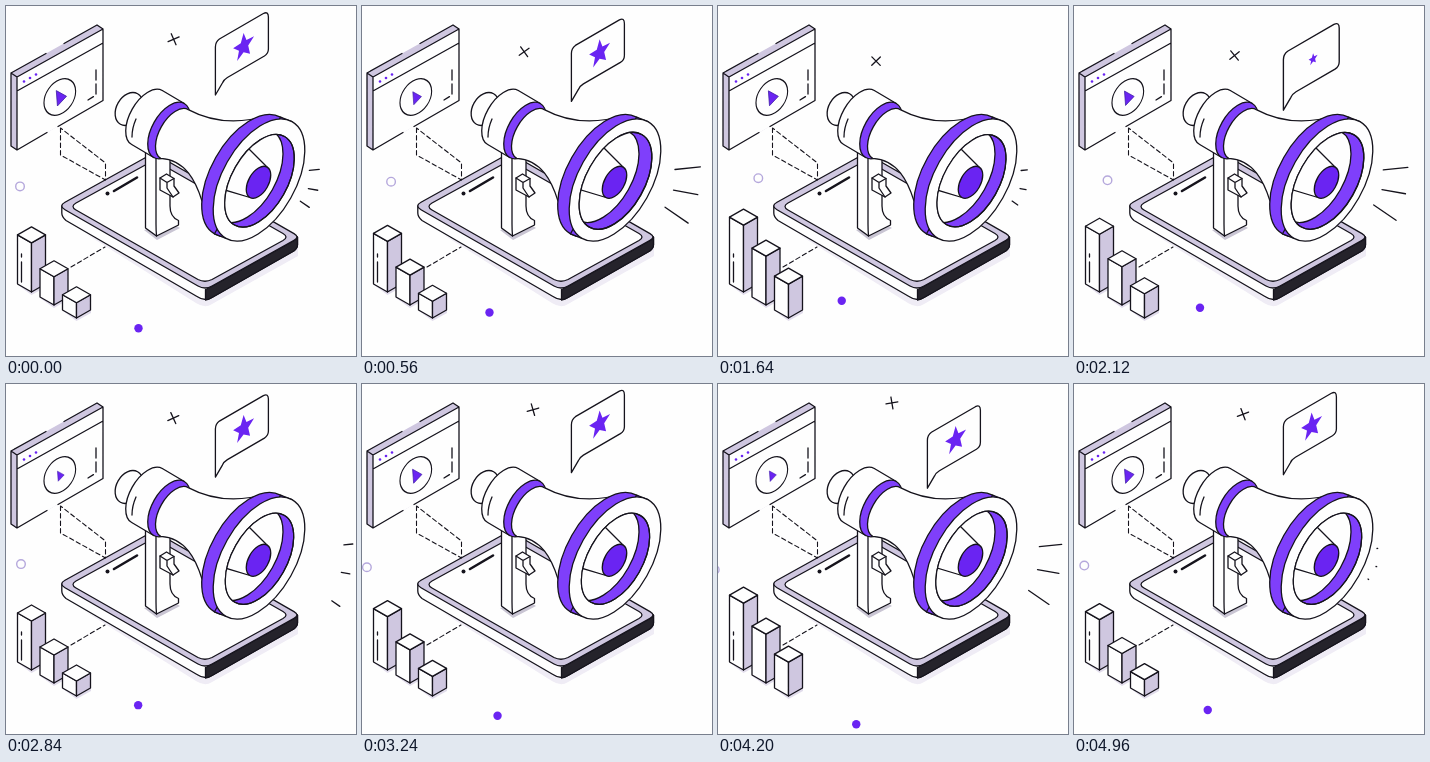
Write an HTML page that moves like this. It is 350x350 px and loops after 5 s.

```html
<!DOCTYPE html>
<html lang="en">
<head>
<meta charset="utf-8">
<title>Megaphone</title>
<style>
  html, body { margin: 0; width: 100%; height: 100%; overflow: hidden; background: #fefefe; }
  svg { display: block; width: 100vw; height: 100vh; }
  .ink { fill: none; stroke: #15131c; stroke-width: 1.3; stroke-linecap: round; stroke-linejoin: round; }
  .w { fill: #fefefe; }
  .l { fill: #cfc7e0; }
  .p { fill: #7f3ffb; }
  .s { fill: #6a24f2; }
  .shade { fill: #efecf5; }
  .dash { stroke-dasharray: 4.5 3; stroke-width: 1.1; }
</style>
</head>
<body>
<svg viewBox="0 0 350 350">
  <defs>
    <clipPath id="mouth"><ellipse class="pulse" rx="29" ry="53.200"/></clipPath>
  </defs>

  <!-- phone -->
  <path class="shade" d="M80 228L190 297Q199 303 206 298L292 250V238L198 285Z"/>
  <g class="ink">
    <path class="w" d="M55.800 200V207Q55.800 211 60 214.500L191 290.500Q199 296 206 291.500L286 246Q291.500 243 291.500 239V231L199 270Z"/>
    <path d="M199.500 283.500Q203 282 206 280.200L288 234.400Q291.500 232.500 291.500 231V239Q291.500 243 286 246L206 291.500Q203 293.500 199.500 294Z" fill="#25232b"/>
    <path class="l" d="M59 196.300L141 150.700Q147.500 147 154 150.700L288 227.600Q294 231 288 234.400L206 280Q199 284 192 280L59 203.800Q52.500 200 59 196.300Z"/>
    <path class="w" d="M70 197L142 157.500Q148 154 154 157.500L277 227.500Q283 231 277 234.500L206 273.500Q199 277 192 273.500L70 204Q64 200.500 70 197Z"/>
    <path d="M108 185L131 171.500" stroke-width="2.6"/>
  </g>
  <circle cx="101.500" cy="187.500" r="2" fill="#15131c"/>

  <!-- connectors -->
  <path class="ink dash" d="M54.500 122V149L99.500 174V157ZM65 261L99 241"/>

  <!-- browser window -->
  <path class="l" d="M5 67L91 19L97 23V94L11 144L5 140Z"/>
  <path class="w" d="M11 71L97 23V94.500L11 144Z"/>
  <g class="ink">
    <path d="M11 144L5 140V67L40 47.500M58 37.500L91 19L97 23V94.500L52 120.500M41 126.500L11 144V71L97 23M5 67L11 71M11 85L97 37"/>
    <path d="M90 64V89L82 94" stroke-dasharray="10 4"/>
    <circle class="w" r="18.200" transform="matrix(.87 -.32 0 .95 53.800 91)"/>
  </g>
  <g class="s">
    <circle cx="18" cy="75.500" r="1.300"/><circle cx="24" cy="72" r="1.300"/><circle cx="30" cy="68.500" r="1.300"/>
    <path id="play" d="M-3 -6.500L6 -1.500L-2 7Z" stroke="#3d1ca5" stroke-width=".7" stroke-linejoin="round"/>
  </g>

  <!-- bars -->
  <path class="l" opacity=".6" d="M12 279L25.500 289L40 281V277ZM34 292L48 302L62 294V290ZM57 305L70.500 315L85 307V303Z"/>
  <g id="bars"></g>

  <!-- grip -->
  <path d="M138 224L151 234L174 222L164 216Z" fill="#c9c5d3"/>
  <g class="ink">
    <path class="w" d="M139.500 145V222L150.500 230L172.500 219V214.500Q164 211 164 200V150Z"/>
    <path d="M150 150V218Q150 224 150.500 230"/>
    <path class="w" d="M154 172L160.500 168L168 172.500V180L173 187L167 191L154 184Z"/>
    <path d="M154 172L161 176.500L168 172.500M161 176.500V182L167 191"/>
  </g>

  <!-- megaphone -->
  <g class="ink">
    <ellipse class="w" cx="123" cy="103" rx="12.500" ry="17.500" transform="rotate(29.500 123 103)"/>
    <path class="w" d="M178.300 97.500L156.300 84.500A17 31 29.500 0 0 125.700 138.500L147.700 151.500Z"/>
    <path d="M126 131Q126 122 130 113"/>
    <ellipse class="p" cx="163" cy="124.500" rx="17" ry="31" transform="rotate(29.500 163 124.500)"/>
    <path class="w" d="M182.300 103.600C198 112 224 121 262 109.500L240 170L196 195C190 176 180 154 154.700 152.400A15 28 29.500 0 1 182.300 103.600Z"/>
    <ellipse class="p" cx="241.500" cy="169.500" rx="36.500" ry="67" transform="rotate(29.500 241.500 169.500)"/>
    <path class="p" d="M274.500 111.200L286 115.700L220 232.300L208.500 227.800Z"/>
    <ellipse class="w" cx="253" cy="174" rx="36.500" ry="67" transform="rotate(29.500 253 174)"/>
    <ellipse class="p pulse" rx="29" ry="53.200"/>
    <g clip-path="url(#mouth)">
      <ellipse class="w" cx="242" cy="170" rx="28" ry="51" transform="rotate(29.500 242 170)"/>
      <path d="M240 140L261 161M214 182.500L244 191.500"/>
    </g>
    <ellipse class="pulse" rx="29" ry="53.200"/>
    <ellipse class="s" cx="252.500" cy="176.300" rx="10" ry="17.500" transform="rotate(29.500 252.500 176.300)"/>
  </g>
  <g id="waves" class="ink"></g>

  <!-- speech bubble -->
  <g id="bubble">
    <path class="ink w" d="M0 0V-48Q0 -53 4 -56L48 -81.500Q53 -84 53 -78V-46Q53 -41.500 49 -39L12 -17.500Q8 -15 7 -12Z"/>
    <path id="star" class="s"/>
  </g>

  <!-- floating bits -->
  <path id="cross" class="ink" d="M-6 0H6M0 -6V6"/>
  <circle id="ring" r="4.300" fill="none" stroke="#b5a8dc" stroke-width="1.400"/>
  <circle id="dot" class="s" r="4.200"/>
</svg>
<script>
  const LOOP = 5000, CYCLE = 5100, BEAT = 1700;
  const $ = id => document.getElementById(id);
  const clamp = x => Math.min(1, Math.max(0, x));
  const ramp = (t, a, b) => clamp((t - a) / (b - a));
  const smooth = x => x * x * (3 - 2 * x);
  const wave = (t, peak, period) => (1 + Math.cos(2 * Math.PI * (t - peak) / period)) / 2;
  const place = (el, x, y, more = '') => el.setAttribute('transform', `translate(${x} ${y}) ${more}`);

  function add(parent, cls) {
    const el = document.createElementNS('http://www.w3.org/2000/svg', 'path');
    el.setAttribute('class', cls);
    parent.append(el);
    return el;
  }

  // centre, foot, highest top, travel
  const bars = [[25.5, 286, 203, 18], [48, 299, 234, 21], [70.5, 312, 262, 19]].map(([x, foot, top, drop]) => ({
    x, foot, top, drop, faces: ['ink w', 'ink l', 'ink w', 'ink'].map(c => add($('bars'), c))
  }));

  function drawBar({ x, foot, top, drop, faces }, k, glint) {
    const y = top + drop * k, l = x - 14, r = x + 14;
    const d = [
      `M${l} ${y + 8}L${x} ${y + 16}V${foot}L${l} ${foot - 8}Z`,
      `M${r} ${y + 8}L${x} ${y + 16}V${foot}L${r} ${foot - 8}Z`,
      `M${x} ${y}L${r} ${y + 8}L${x} ${y + 16}L${l} ${y + 8}Z`,
      glint ? `M${l + 4} ${foot - 30}V${foot - 10}M${l + 4} ${foot - 38}V${foot - 35}` : ''
    ];
    faces.forEach((f, i) => f.setAttribute('d', d[i]));
  }

  const waves = [[303, 164.5, 347, 160], [302, 182.5, 344, 190], [294, 195, 334, 222.5]]
    .map(p => ({ p, el: add($('waves'), '') }));

  const starPoints = Array.from({ length: 10 }, (_, i) => {
    const a = Math.PI * i / 5, r = i % 2 ? 5.5 : 12.5;
    return `${(r * Math.sin(a)).toFixed(2)} ${(-r * Math.cos(a)).toFixed(2)}`;
  });
  $('star').setAttribute('d', `M${starPoints.join('L')}Z`);

  function bubbleDrop(t) {
    if (t < 1100) return wave(t, 1100, 2000);
    return t < 2200 ? 1 : wave(t, 2200, 2000);
  }

  function bubbleScale(t) {
    if (t < 1700) return 1 - smooth(ramp(t, 1160, 1420));
    if (t < 1980) return 1.12 * smooth(ramp(t, 1700, 1980));
    return 1.12 - 0.12 * smooth(ramp(t, 1980, 2240));
  }

  function starScale(t) {
    return t < 1500 ? 1 - smooth(ramp(t, 860, 1110)) : smooth(ramp(t, 2010, 2260));
  }

  function draw(t) {
    const drift = Math.sin((-11.5 + 360 * t / CYCLE) * Math.PI / 180);
    place($('cross'), 166 - 8.2 * drift, 37 + 18.7 * drift, `rotate(${63 - 18 * drift})`);
    place($('ring'), 18.5 + 22.5 * drift, 179 - 7 * drift);
    place($('dot'), 131 - 7.5 * drift, 317.5 - 23.5 * drift);

    const k = smooth(wave(t, 200, CYCLE / 2));
    bars.forEach((b, i) => drawBar(b, k, i === 0));

    place($('play'), 53.7, 92, `scale(${0.72 + 0.45 * wave(t, 150, BEAT)})`);

    const beat = (t + 150) % BEAT;
    const size = 0.93 + 0.07 * wave(beat, 650, BEAT);
    document.querySelectorAll('.pulse').forEach(e => place(e, 253.5, 174.8, `rotate(29.5) scale(${size})`));

    const u = clamp(beat / 1440), head = 1 - (1 - u) ** 2.4, tail = u ** 2.1;
    for (const { p: [x, y, x2, y2], el } of waves) {
      const at = s => `${x + (x2 - x) * s} ${y + (y2 - y) * s}`;
      el.setAttribute('d', u < 1 ? `M${at(tail)}L${at(head)}` : '');
    }

    place($('bubble'), 209.4, 88.6 + 15.6 * bubbleDrop(t), `scale(${bubbleScale(t)})`);
    place($('star'), 28.2, -48.6, `scale(${starScale(t)}) matrix(.88 -.5 0 1.08 0 0)`);
  }

  let start;
  function tick(now) {
    start ??= now;
    draw((now - start) % LOOP);
    requestAnimationFrame(tick);
  }
  draw(0);
  requestAnimationFrame(tick);
</script>
</body>
</html>
```
